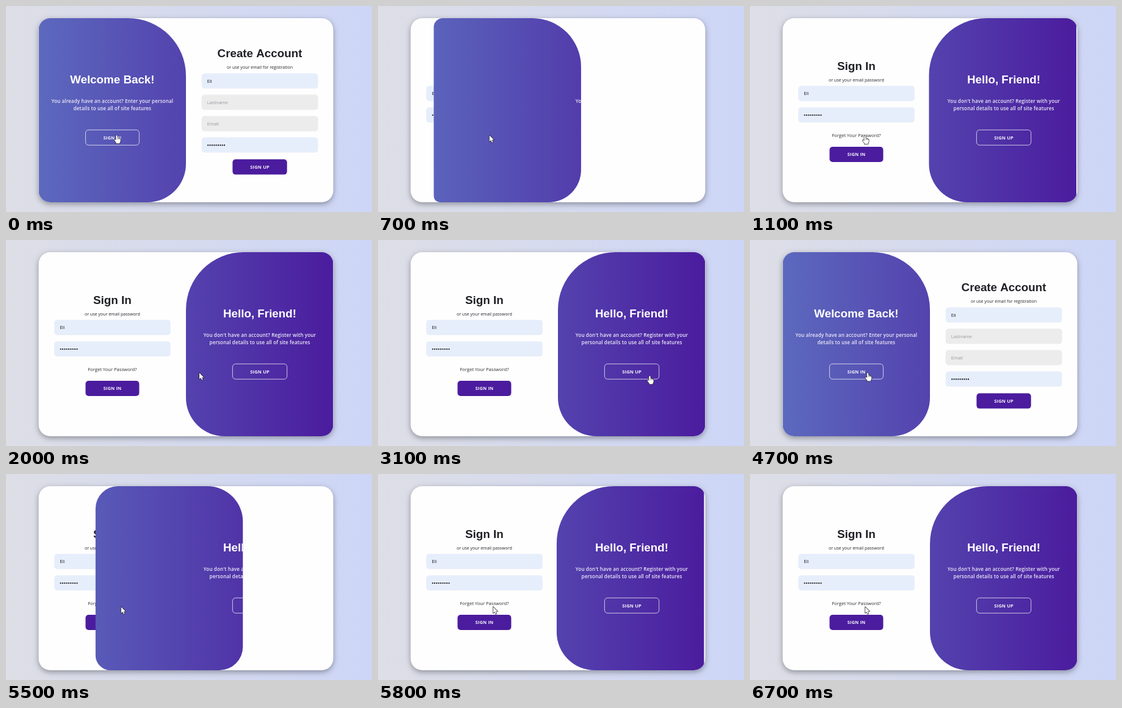
Animation of 600 by 338 pixels, one loop 6.8 s. Source, as an HTML page with a canvas:

```html
<!DOCTYPE html>
<html lang="en">
<head>
<meta charset="utf-8">
<title>Sign in and sign up</title>
<style>
  html, body { margin: 0; width: 100%; height: 100%; overflow: hidden; }
  canvas { display: block; width: 600px; height: 338px; }
</style>
</head>
<body>
<canvas id="stage"></canvas>
<script>
const LOOP = 6800, STEP = 100, SLIDE = 600;
const CARD = { x: 53.5, y: 20, w: 483, h: 302, r: 19 };
const HALF = CARD.w / 2;
const LEFT = 174.3, RIGHT = 416;
const PURPLE = '#4b1c9e';
const SANS = '"Open Sans", "Noto Sans", sans-serif';
const HEAD = '"Liberation Sans", Arial, sans-serif';

// Clicks that slide the panel: time and side it goes to (0 left, 1 right).
const CLICKS = [[535, 1], [3115, 0], [5240, 1]];

// Pointer stops: time, x, y.
const PATH = [
  [0, 181.5, 212], [535, 181.5, 212], [1100, 188.5, 213], [1500, 188.5, 213],
  [2500, 445.5, 223], [3115, 445.5, 223], [3600, 441.2, 222], [3700, 441.2, 222],
  [4500, 193, 218], [5240, 193, 218], [5500, 188.8, 218], [LOOP, 188.8, 218]
];

const canvas = document.getElementById('stage');
const ctx = canvas.getContext('2d');
const dpr = window.devicePixelRatio || 1;
canvas.width = 600 * dpr;
canvas.height = 338 * dpr;
ctx.scale(dpr, dpr);

const mix = (a, b, k) => a + (b - a) * k;

// cubic-bezier(.42, 0, .58, 1)
function easeInOut(x) {
  if (x <= 0) return 0;
  if (x >= 1) return 1;
  let lo = 0, hi = 1, s = 0.5;
  for (let i = 0; i < 24; i++) {
    s = (lo + hi) / 2;
    const bx = 3 * (1 - s) * (1 - s) * s * 0.42 + 3 * (1 - s) * s * s * 0.58 + s * s * s;
    if (bx < x) lo = s; else hi = s;
  }
  return s * s * (3 - 2 * s);
}

function panelAt(t) {
  let side = 0, p = 0;
  for (const [start, to] of CLICKS) {
    if (t < start) break;
    const k = easeInOut((t - start) / SLIDE);
    side = to;
    p = to ? k : 1 - k;
  }
  return { side, p };
}

function pointerAt(t) {
  const i = Math.max(1, PATH.findIndex(k => k[0] > t));
  const [t0, x0, y0] = PATH[i - 1], [t1, x1, y1] = PATH[i];
  const k = easeInOut((t - t0) / (t1 - t0));
  return { x: mix(x0, x1, k), y: mix(y0, y1, k) };
}

function box(x, y, w, h, r) {
  ctx.beginPath();
  ctx.roundRect(x, y, w, h, r);
}

function gradient(x0, x1, from, to) {
  const g = ctx.createLinearGradient(x0, 0, x1, 0);
  g.addColorStop(0, from);
  g.addColorStop(1, to);
  return g;
}

function text(str, x, y, font, color, align = 'center', spacing = 0) {
  ctx.font = font;
  ctx.fillStyle = color;
  ctx.textAlign = align;
  ctx.letterSpacing = spacing + 'px';
  ctx.fillText(str, x, y);
}

const title = (str, x, y, color) => text(str, x, y, `bold 18.8px ${HEAD}`, color);
const note = (str, x, y) => text(str, x, y, `7.05px ${SANS}`, '#24252b');
const copy = (str, x, y) => text(str, x, y, `600 8.1px ${SANS}`, '#ece9f8', 'center', 0.1);

function field(x, y, value, filled) {
  box(x, y, 191, 25, 5);
  ctx.fillStyle = filled ? '#e7eefb' : '#ececec';
  ctx.fill();
  if (value) {
    text(value, x + 9.2, y + 15.4, `7.5px ${SANS}`, filled ? '#15161a' : '#97979f', 'left');
    return;
  }
  ctx.fillStyle = '#15161a';
  for (let i = 0; i < 9; i++) {
    ctx.beginPath();
    ctx.arc(x + 10.6 + i * 3.35, y + 12.8, 1.15, 0, 7);
    ctx.fill();
  }
}

function button(label, x, y, w, ghost) {
  box(x, y, w, 25, 5);
  if (ghost) {
    ctx.strokeStyle = 'rgba(255,255,255,.8)';
    ctx.lineWidth = 0.9;
    ctx.stroke();
  } else {
    ctx.fillStyle = PURPLE;
    ctx.fill();
  }
  text(label, x + w / 2, y + 15.3, `bold 7.5px ${SANS}`, '#f4f2fb', 'center', 0.15);
}

function signInForm() {
  title('Sign In', LEFT, 104.7, '#1f2025');
  note('or use your email password', LEFT, 123.6);
  field(79, 131, 'Eli', true);
  field(79, 166.3, '', true);
  text('Forget Your Password?', LEFT, 214.8, `7.6px ${SANS}`, '#2b2b31');
  button('SIGN IN', 130.4, 231, 88);
}

function signUpForm() {
  title('Create Account', RIGHT, 83.8, '#1f2025');
  note('or use your email for registration', RIGHT, 102.9);
  field(320.6, 110.4, 'Eli', true);
  field(320.6, 145.6, 'Lastname', false);
  field(320.6, 180.5, 'Email', false);
  field(320.6, 215.6, '', true);
  button('SIGN UP', 371.4, 251.6, 89.3);
}

function panel(side, p) {
  const big = 94.5, small = 63, q = 1 - p;
  ctx.save();
  box(CARD.x + HALF * p, CARD.y, HALF, CARD.h, [big * p, big * q, small * q, small * p]);
  ctx.clip();
  ctx.fillStyle = gradient(CARD.x, CARD.x + CARD.w, '#5c69be', PURPLE);
  ctx.fillRect(CARD.x, CARD.y, CARD.w, CARD.h);
  if (side) {
    title('Hello, Friend!', RIGHT, 126.6, '#fff');
    copy('You don\'t have an account? Register with your', RIGHT, 158.9);
    copy('personal details to use all of site features', RIGHT, 171.3);
    button('SIGN UP', 371.4, 203.3, 89.3, true);
  } else {
    title('Welcome Back!', LEFT, 126.6, '#fff');
    copy('You already have an account? Enter your personal', LEFT, 158.9);
    copy('details to use all of site features', LEFT, 171.3);
    button('SIGN IN', 130.4, 203.3, 88, true);
  }
  ctx.restore();
}

function isLink({ x, y }, side, p) {
  const over = (l, t, r, b) => x >= l && x <= r && y >= t && y <= b;
  if (!side) return over(130, 203, 218, 228.5) || over(371, 251, 461, 277);
  const open = x < CARD.x + HALF * p;
  return over(371, 203, 461, 228.5) ||
    (open && (over(134, 206, 215, 217) || over(130, 231, 218, 256)));
}

const ARROW = new Path2D('M0 0V10.2L2.4 8L4 11.8L5.7 11L4.1 7.4H7.3Z');
const HAND = new Path2D('M-1.2 1Q0 -.8 1.2 1V4.6Q2.4 3.9 3 5Q4.3 4.4 4.8 5.6' +
  'Q6.2 5.2 6.2 6.8V9.4Q6.2 11.2 5 12.2V13.6H-.8V12.2Q-2 10.8 -3.8 8.2Q-4 6.6 -2.4 7.1L-1.2 8.2Z');

function pointer(pos, link) {
  const shape = link ? HAND : ARROW;
  ctx.save();
  ctx.translate(pos.x, pos.y);
  ctx.lineJoin = 'round';
  ctx.lineWidth = 1.3;
  ctx.strokeStyle = '#17171c';
  ctx.stroke(shape);
  ctx.fillStyle = '#fff';
  ctx.fill(shape);
  if (link) {
    ctx.lineWidth = 0.5;
    ctx.beginPath();
    for (const x of [1.2, 3, 4.8]) {
      ctx.moveTo(x, 5.2);
      ctx.lineTo(x, 7);
    }
    ctx.stroke();
  }
  ctx.restore();
}

function draw(t) {
  const { side, p } = panelAt(t);
  ctx.fillStyle = gradient(0, 600, '#dddee6', '#cdd6f7');
  ctx.fillRect(0, 0, 600, 338);

  ctx.save();
  ctx.shadowColor = 'rgba(0,0,0,.35)';
  ctx.shadowBlur = 9.4 * dpr;
  ctx.shadowOffsetY = 3.1 * dpr;
  ctx.fillStyle = '#fefefe';
  box(CARD.x, CARD.y, CARD.w, CARD.h, CARD.r);
  ctx.fill();
  ctx.restore();

  ctx.save();
  box(CARD.x, CARD.y, CARD.w, CARD.h, CARD.r);
  ctx.clip();
  if (side) signInForm(); else signUpForm();
  panel(side, p);
  ctx.restore();

  const pos = pointerAt(t);
  pointer(pos, isLink(pos, side, p));
}

function tick() {
  const t = performance.now() % LOOP;
  draw(Math.floor(t / STEP) * STEP);
  requestAnimationFrame(tick);
}
tick();
</script>
</body>
</html>
```
